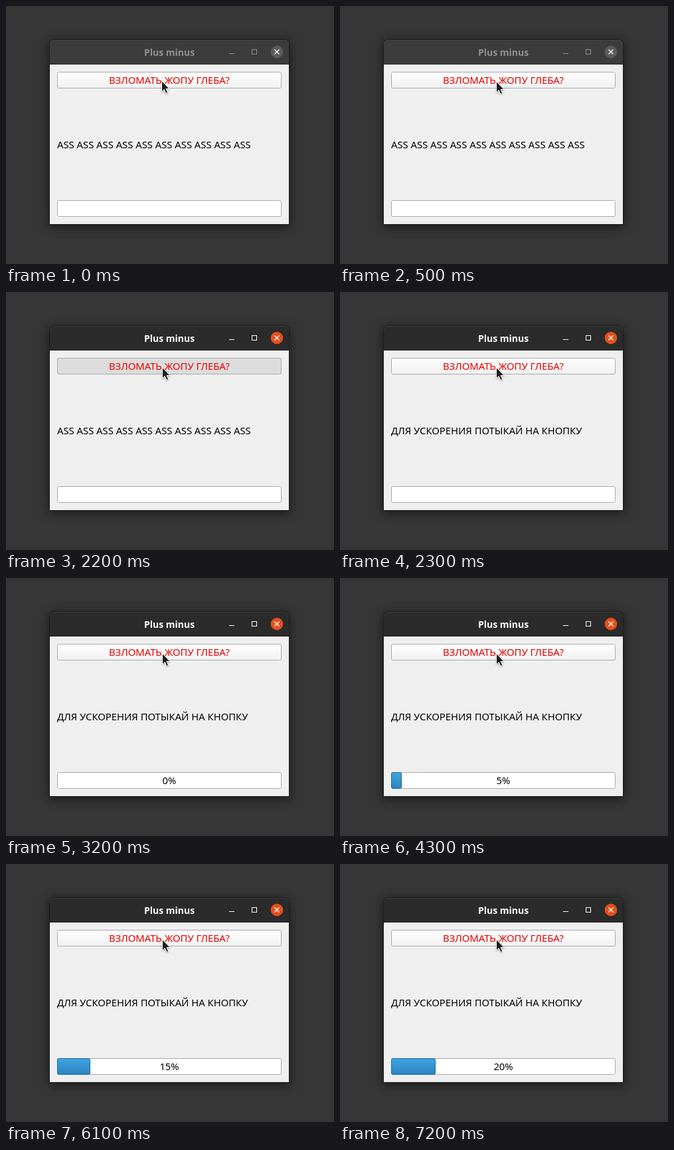
An HTML page that plays this animation: 494x388 px, repeating every 8 s.

```html
<!DOCTYPE html>
<html lang="ru">
<head>
<meta charset="utf-8">
<title>Plus minus</title>
<style>
  html, body { margin: 0; width: 100%; height: 100%; overflow: hidden; background: #363636; }
  svg { display: block; }
  text { font-family: "Noto Sans", "Open Sans", sans-serif; font-size: 14.8px; }
  .mid { text-anchor: middle; }
  .title { font-size: 14px; font-weight: 700; }
  .shadow { filter: drop-shadow(0 3px 8px rgba(0, 0, 0, .55)); }

  svg * { animation: 8s step-end infinite; }
  .bar { animation-name: bar; }
  .edge { animation-name: edge; }
  .glyph { fill: #919191; animation-name: glyph; }
  .box { fill: none; stroke: #919191; animation-name: box; }
  .close { animation-name: close; }
  .pressed { animation-name: press; }
  .before { animation-name: before; }
  .after { animation-name: after; }
  .strip { animation-name: count; }
  .fill { animation-name: fill; }
  .cursor { animation-name: point; }

  @keyframes bar { 0% { fill: #3c3c3c; } 27.5%, to { fill: #2b2b2b; } }
  @keyframes edge { 0% { stroke: #484848; } 27.5%, to { stroke: #3b3b3b; } }
  @keyframes glyph { 0% { fill: #919191; } 27.5%, to { fill: #fff; } }
  @keyframes box { 0% { stroke: #919191; } 27.5%, to { stroke: #fff; } }
  @keyframes close { 0% { fill: #5b5b5b; } 27.5%, to { fill: #e2511d; } }
  @keyframes press { 0% { opacity: 0; } 27.5% { opacity: 1; } 28.75%, to { opacity: 0; } }
  @keyframes before { 0% { opacity: 1; } 28.75%, to { opacity: 0; } }
  @keyframes after { 0% { opacity: 0; } 28.75%, to { opacity: 1; } }
  @keyframes point { 0% { transform: translate(-1px, -1px); } 6.25%, to { transform: none; } }
  @keyframes count {
    0% { transform: translateY(40px); }
    40% { transform: none; }
    53.75% { transform: translateY(-40px); }
    63.75% { transform: translateY(-80px); }
    76.25% { transform: translateY(-120px); }
    90%, to { transform: translateY(-160px); }
  }
  @keyframes fill {
    0% { width: 0; opacity: 0; }
    53.75% { width: 15px; opacity: 1; }
    63.75% { width: 32px; opacity: 1; }
    76.25% { width: 49px; opacity: 1; }
    90%, to { width: 66px; opacity: 1; }
  }
</style>
</head>
<body>
<svg width="494" height="388" viewBox="0 0 494 388">
  <defs>
    <linearGradient id="face" x2="0" y2="1">
      <stop stop-color="#fefefe"/><stop offset="1" stop-color="#f1f1f1"/>
    </linearGradient>
    <linearGradient id="blue" x2="0" y2="1">
      <stop stop-color="#3ea3e0"/><stop offset="1" stop-color="#2c85c0"/>
    </linearGradient>
    <clipPath id="slot"><rect x="78" y="293" width="336" height="24"/></clipPath>
  </defs>
  <rect width="494" height="388" fill="#363636"/>

  <path class="shadow" d="M65 329V58q0-8 8-8H419q8 0 8 8V329z" fill="#1d1d1d"/>
  <path class="bar" d="M66 88V58q0-7 7-7H419q7 0 7 7V88z"/>
  <path class="edge" d="M66.500 58q0-6.500 6.500-6.500H419q6.500 0 6.500 6.500" fill="none"/>
  <rect x="66" y="87" width="360" height="1" fill="#202020"/>
  <rect x="66" y="88" width="360" height="240" fill="#efefef"/>

  <text class="mid title glyph" x="246" y="75">Plus minus</text>
  <rect class="glyph" x="336" y="71" width="8" height="1"/>
  <rect class="box" x="370.500" y="65.500" width="7" height="7"/>
  <circle class="close" cx="408" cy="69" r="9.300"/>
  <path d="M404.500 65.500l7 7m0-7l-7 7" stroke="#fff" stroke-width="1.300"/>

  <rect x="77.500" y="99.500" width="337" height="24" rx="2" fill="url(#face)" stroke="#ababab"/>
  <rect class="pressed" x="77.500" y="99.500" width="337" height="24" rx="2" fill="#dcdcdc" stroke="#ababab"/>
  <text class="mid" x="246" y="117" fill="#e60000">ВЗЛОМАТЬ ЖОПУ ГЛЕБА?</text>

  <text class="before" x="77" y="214">ASS ASS ASS ASS ASS ASS ASS ASS ASS ASS</text>
  <text class="after" x="77" y="214">ДЛЯ УСКОРЕНИЯ ПОТЫКАЙ НА КНОПКУ</text>

  <rect x="77.500" y="292.500" width="337" height="24" rx="2" fill="#fff" stroke="#ababab"/>
  <rect class="fill" x="77.500" y="292.500" width="0" height="24" rx="2" fill="url(#blue)" stroke="#206a9c"/>
  <g clip-path="url(#slot)">
    <g class="strip mid">
      <text x="246" y="310">0%</text>
      <text x="246" y="350">5%</text>
      <text x="246" y="390">10%</text>
      <text x="246" y="430">15%</text>
      <text x="246" y="470">20%</text>
    </g>
  </g>

  <g class="cursor">
    <path d="M235.500 113.500V130l3.700-3.500 2.700 6 2.800-1.200-2.700-5.800h5z" fill="#1c1c1c" stroke="#fff" stroke-linejoin="round" style="filter: drop-shadow(0 1px 1px rgba(0, 0, 0, .35))"/>
  </g>
</svg>
</body>
</html>
```
